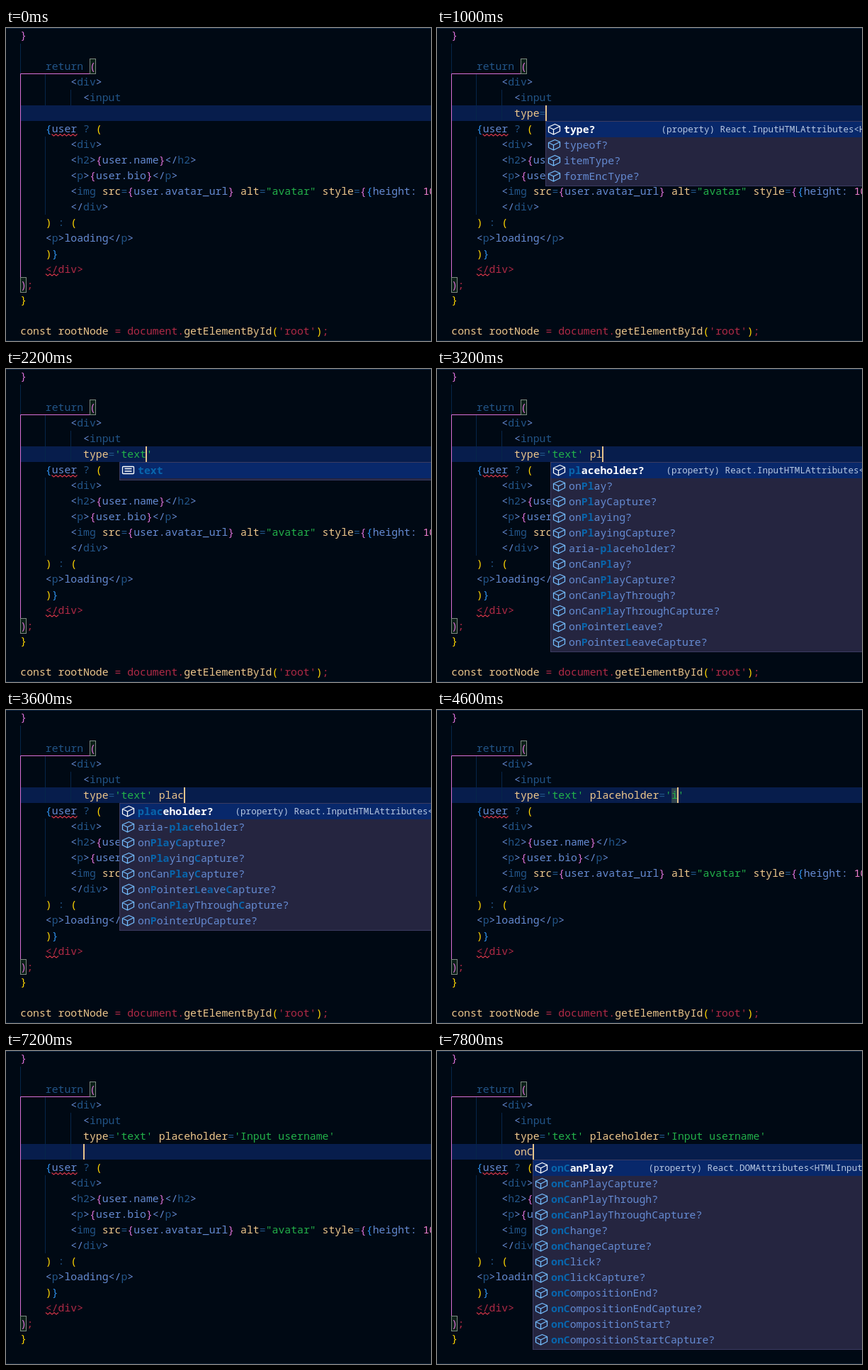
An HTML page that plays this animation: 600 px wide and 441 px high, repeating every 8000 ms.

```html
<!DOCTYPE html>
<html lang="en">
<head>
<meta charset="utf-8">
<title>Code editor</title>
<style>
html, body { margin: 0; width: 100%; height: 100%; overflow: hidden; background: #000914; }
svg { display: block; width: 600px; height: 441px; }
text { font: 500 14.8px "Noto Sans Mono", "DejaVu Sans Mono", monospace; white-space: pre; }
.b { fill: #658bd2; }
.k { fill: #225588; }
.t { fill: #eec78c; }
.g { fill: #22b14a; }
.r { fill: #b02a46; }
.y { fill: #ffd700; }
.o { fill: #da70d6; }
.c { fill: #2f93f0; }
.n { fill: #f280d0; }
.w { fill: #fff; font-weight: 600; }
.hit { fill: #0866ad; font-weight: 700; }
.detail { font-size: 12.6px; fill: #b8c8e2; }
.guide { stroke: #06264a; fill: none; }
.pair { stroke: #da70d6; fill: none; }
.match { stroke: #7d8a80; fill: #0b2018; }
.wave { stroke: #e0394c; fill: none; stroke-width: 1.1; }
.icon { fill: none; stroke: #75beff; stroke-width: 1.3; stroke-linejoin: round; }
.icon.on { stroke: #fff; }
</style>
</head>
<body>
<svg id="stage" viewBox="0 0 600 441"></svg>
<script>
const stage = document.getElementById('stage');
const LEFT = 20.3, CHAR = 8.88, ROW = 21.95, STEP = 200, COUNT = 40;
const colX = col => LEFT + col * CHAR;
const rowTop = row => -0.7 + row * ROW;

function add(parent, tag, attrs = {}, content) {
  const node = document.createElementNS('http://www.w3.org/2000/svg', tag);
  for (const name in attrs) node.setAttribute(name, attrs[name]);
  if (content !== undefined) node.textContent = content;
  return parent.appendChild(node);
}
const box = (parent, x, y, width, height, attrs) =>
  add(parent, 'rect', { x, y, width, height, ...attrs });

// tokens: [class, text] pairs set one after another
function write(parent, x, y, tokens) {
  const text = add(parent, 'text', { x, y });
  tokens.forEach(([cls, part]) => add(text, 'tspan', { class: cls }, part));
}
// source: pieces parted by "~", each led by its class letter
const code = (parent, row, col, source) =>
  write(parent, colX(col), rowTop(row) + 16, source.split('~').map(s => [s[0], s.slice(1)]));

function wave(parent, x, y, width) {
  let d = `M${x} ${y}`;
  for (let i = 1; i * 3 <= width; i++) d += `l3 ${i % 2 ? 2.6 : -2.6}`;
  add(parent, 'path', { class: 'wave', d });
}
const guide = (parent, col, top, bottom) =>
  add(parent, 'path', { class: 'guide', d: `M${Math.floor(colX(col)) + .5} ${top}V${bottom}` });

const TOP = [
  [0, 0, 'o}'],
  [2, 4, 'kreturn ~o('],
  [3, 8, 'b<~kdiv~b>'],
  [4, 10, 'b<~kinput']
];
const BOTTOM = [
  [6, 4, 'c{~buser~k ? ~y('],
  [7, 8, 'b<~kdiv~b>'],
  [8, 8, 'b<~kh2~b>~o{~buser.name~o}~b</~kh2~b>'],
  [9, 8, 'b<~kp~b>~o{~buser.bio~o}~b</~kp~b>'],
  [10, 8, 'b<~kimg ~tsrc~k=~o{~buser.avatar_url~o}~t alt~k=~g"avatar"~t style~k=~o{~c{~bheight: ~n100'],
  [11, 8, 'b</~kdiv~b>'],
  [12, 4, 'y)~k : ~y('],
  [13, 4, 'b<~kp~b>loading</~kp~b>'],
  [14, 4, 'y)~c}'],
  [15, 4, 'r</div>'],
  [16, 0, 'o)~r;'],
  [17, 0, 'y}'],
  [19, 0, 'tconst rootNode ~r= document.~tgetElementById~y(~r\'root\'~y)~r;']
];

const INPUT = 'React.InputHTMLAttributes<HTMLInputElement>.';
const DOM = 'React.DOMAttributes<HTMLInputElement>.';
const list = (query, names, detail) => ({ query, names: names.split(' '), detail });
const values = (query, names) => ({ query, names: names.split(' '), plain: true });
const TYPES = 'type? typeof? itemType? formEncType?';
const PLAY = 'placeholder? onPlay? onPlayCapture? onPlaying? onPlayingCapture? aria-placeholder? ' +
  'onCanPlay? onCanPlayCapture? onCanPlayThrough? onCanPlayThroughCapture?';
const ON = 'onCanPlay? onCanPlayCapture? onCanPlayThrough? onCanPlayThroughCapture? onChange? ' +
  'onChangeCapture? onClick? onClickCapture? onCompositionEnd? onCompositionEndCapture? ' +
  'onCompositionStart? onCompositionStartCapture?';
const ON_ANY = 'onAbort? onAbortCapture? onAnimationEnd? onAnimationEndCapture? onAnimationIteration? ' +
  'onAnimationStart? onAuxClick? onAuxClickCapture? onBeforeInput? onBlur? onBlurCapture? onCanPlay?';

const FIELD = "type='text' ", NAMED = FIELD + 'placeholder', FULL = NAMED + "='Input username'";
const hint = word => `${NAMED}='${word}|'`;

// [step, text with "|" as caret, popup]; a text after "\n" stands on a new row
const STATES = [
  [0, ''],
  [1, 't|', list('t', 'type? title? tabIndex? translate? typeof? itemType? onTouchEnd? onTouchMove? ' +
    'onTouchStart? onTouchCancel? onTimeUpdate? onTransitionEnd?', INPUT)],
  [2, 'ty|', list('ty', TYPES + ' style? property? contentEditable? security?', INPUT)],
  [3, 'typ|', list('typ', TYPES, INPUT)],
  [4, 'type|', list('type', TYPES, INPUT)],
  [5, 'type=|', list('', TYPES, INPUT)],
  [6, "type='|'", values('', 'button checkbox color date datetime-local email file hidden image month number password')],
  [7, "type='t|'", values('t', 'tel text time button date datetime-local reset submit')],
  [8, "type='te|'", values('te', 'tel text date datetime-local')],
  [9, "type='tex|'", values('tex', 'text')],
  [10, "type='text|'", values('text', 'text')],
  [12, "type='text'|"],
  [13, FIELD + '|'],
  [14, FIELD + 'p|', list('p', 'pattern? placeholder? prefix? property? onPaste? onPasteCapture? onPause? ' +
    'onPauseCapture? onPlay? onPlayCapture? onPlaying? onPlayingCapture?', INPUT)],
  [15, FIELD + 'pl|', list('pl', PLAY + ' onPointerLeave? onPointerLeaveCapture?', INPUT)],
  [17, FIELD + 'pla|', list('pla', PLAY, INPUT)],
  [18, FIELD + 'plac|', list('plac', 'placeholder? aria-placeholder? onPlayCapture? onPlayingCapture? ' +
    'onCanPlayCapture? onPointerLeaveCapture? onCanPlayThroughCapture? onPointerUpCapture?', INPUT)],
  [19, NAMED + '|'],
  [20, NAMED + '=|'],
  [21, hint('')],
  [23, hint('i')],
  [24, hint('')],
  [25, hint('I')],
  [26, hint('In')],
  [27, hint('Inpu')],
  [28, hint('Input')],
  [29, hint('Input ')],
  [30, hint('Input us')],
  [31, hint('Input user')],
  [32, hint('Input userna')],
  [33, hint('Input username')],
  [34, FULL + '|'],
  [35, FULL + '\n|'],
  [37, FULL + '\no|', list('o', ON_ANY, DOM)],
  [38, FULL + '\non|', list('on', ON_ANY, DOM)],
  [39, FULL + '\nonC|', list('onC', ON, DOM)]
];

function typed(parent, row, source) {
  const parts = source.match(/'[^']*'|=|[^'=]+/g) || [];
  write(parent, colX(10), rowTop(row) + 16,
    parts.map(p => [p[0] === "'" ? 'g' : p === '=' ? 'k' : 't', p]));
}

function labelTokens(name, query, base) {
  const lower = name.toLowerCase(), wanted = query.toLowerCase();
  const start = lower.indexOf(wanted);
  let next = 0;
  return [...name].map((ch, i) => {
    const hit = start >= 0 ? i >= start && i < start + wanted.length
      : next < wanted.length && lower[i] === wanted[next] && ++next;
    return [hit ? 'hit' : base, ch];
  });
}

function icon(parent, x, y, plain, on) {
  const d = plain
    ? 'M-7 -5H7Q8 -5 8 -4V4Q8 5 7 5H-7Q-8 5 -8 4V-4Q-8 -5 -7 -5ZM-5 -2H5M-5 1.5H5'
    : 'M1 -7L8 -4V3L-1 7.5L-8 4V-3ZM-8 -3L-1 .5L8 -4M-1 .5V7.5';
  add(parent, 'path', { class: on ? 'icon on' : 'icon', d, transform: `translate(${x} ${y})` });
}

function popup(parent, x, y, { query, names, detail, plain }) {
  box(parent, x + .5, y + .5, 640, names.length * 22 + 3, { fill: '#252540', stroke: '#3b3b62' });
  box(parent, x + 1, y + 1, 640, 22, { fill: '#08286b' });
  names.forEach((name, i) => {
    const mid = y + 12 + i * 22;
    icon(parent, x + 12.5, mid - .5, plain, i === 0);
    write(parent, x + 26, mid + 5, labelTokens(name, query, i ? 'b' : 'w'));
  });
  if (detail) add(parent, 'text', { class: 'detail', x: x + 163.5, y: y + 16 }, '(property) ' + detail + names[0]);
}

const under = add(stage, 'g');
const upper = add(stage, 'g');
const lower = add(stage, 'g');
const live = add(stage, 'g');

box(stage, 0, 0, 600, 1, { fill: '#0c2440' });
box(stage, 0, 440, 600, 1, { fill: '#0a1c32' });
guide(upper, 0, 22, 65);
guide(upper, 4, 65, 109);
guide(upper, 8, 87, 109);
box(upper, 118.5, 43.5, 8, 21, { class: 'match' });
TOP.forEach(args => code(upper, ...args));
guide(lower, 4, 153, 263);
box(lower, 20.5, 351.5, 8, 21, { class: 'match' });
BOTTOM.forEach(args => code(lower, ...args));
wave(lower, 64.5, 149.5, 36);
wave(lower, 56, 346.5, 18);

function draw(step) {
  const [, source, menu] = STATES.filter(s => s[0] <= step).pop();
  const lines = source.split('\n');
  const row = 4 + lines.length, top = Math.round(rowTop(row));
  const shift = (lines.length - 1) * 22;
  under.replaceChildren();
  live.replaceChildren();
  lower.setAttribute('transform', `translate(0 ${shift})`);
  box(under, 20, top, 580, 22, { fill: '#071d4c' });
  if (source) [4, 8].forEach(col => guide(under, col, 109, top + 22));
  add(live, 'path', { class: 'pair', d: `M118 64.5H20.5V${351 + shift}` });

  const caret = lines[lines.length - 1].indexOf('|');
  const x = colX(10 + caret);
  if (source.includes("'i|'")) box(live, x - CHAR, top + 1, CHAR + 1, 21, { fill: '#30444f' });
  lines.forEach((line, i) => typed(live, 5 + i, line.replace('|', '')));
  if (caret >= 0) box(live, Math.floor(x), top, 2, 22, { fill: '#e8c48c' });
  if (menu) popup(live, Math.min(Math.floor(x), 160), top + 22, menu);
}

let shown = -1;
function tick() {
  const step = Math.floor(performance.now() / STEP) % COUNT;
  if (step !== shown) draw(shown = step);
  requestAnimationFrame(tick);
}
tick();
</script>
</body>
</html>
```
